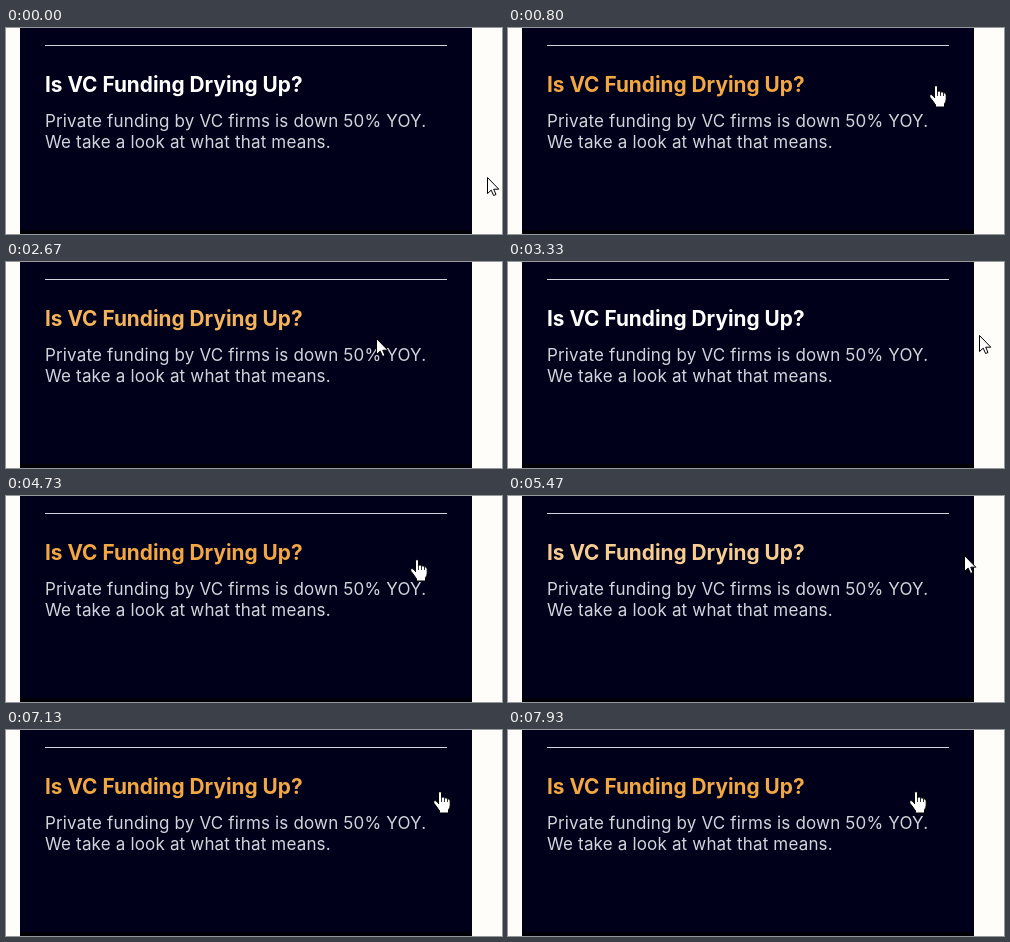
Animation of 496 by 206 pixels, one loop 8 s. Source, as an HTML page with a canvas:

```html
<!DOCTYPE html>
<html lang="en">
<head>
<meta charset="utf-8">
<title>Article link hover</title>
<style>
  html, body { margin: 0; width: 100%; height: 100%; overflow: hidden; background: #fffdf9; }
  body { position: relative; font-family: Inter, sans-serif; }
  .card { position: absolute; left: 14px; top: 0; width: 452px; height: 202px; background: #00001a; border-bottom: 4px solid #000006; }
  .rule { position: absolute; left: 25px; top: 17px; width: 402px; height: 1px; background: #d1d5db; }
  h3, p { position: absolute; left: 25px; margin: 0; white-space: nowrap; }
  h3 { top: 43px; font-size: 20.8px; font-weight: 700; line-height: 28px; color: #fff; }
  p { top: 83px; font-size: 17px; line-height: 21px; letter-spacing: 0.01em; color: #d1d5db; }
  canvas { position: absolute; left: 0; top: 0; }
</style>
</head>
<body>
<div class="card">
  <div class="rule"></div>
  <h3 id="title">Is VC Funding Drying Up?</h3>
  <p>Private funding by VC firms is down 50% YOY.<br>We take a look at what that means.</p>
</div>
<canvas id="stage" width="496" height="206"></canvas>
<script>
const STEPS = 120, STEP = 1000 / 15, FADE = 300;
const LINK = { right: 441, bottom: 74 };
const WHITE = [255, 255, 255], ORANGE = [242, 167, 66];
const title = document.getElementById('title');
const ctx = document.getElementById('stage').getContext('2d');

// Turning points of the pointer: time, x, y
const path = [
  [0, 481, 149], [470, 437, 72], [800, 427, 57], [1730, 238, 57], [2200, 238, 57],
  [2800, 405, 79], [3330, 471, 73], [3800, 477, 73], [4730, 410, 63], [4950, 392, 61],
  [5670, 471, 59], [5870, 471, 59], [6470, 420, 61], [6735, 420, 61], [7030, 439, 61],
  [7330, 418, 61], [7600, 426, 61], [7930, 407, 61]
];

const arrow = new Path2D('M.5 .5V16.6L4.2 13.1L6.6 18.5L9 17.5L6.7 12.2H11.8Z');
const hand = new Path2D(
  'M5.5 13V2Q5.5 .5 7 .5T8.5 2V6.3Q10.8 5.4 11.5 7Q13.3 6.2 14.5 7.8Q17.2 7.4 17.2 10V14.2' +
  'Q17.2 16.5 15.5 19V22H6.5V19.5Q5.4 18.6 4 16.2L.9 12.2Q0 10.4 1.6 9.7Q2.8 9.3 4 10.7L5.5 12.4Z');
const knuckles = new Path2D('M8.5 6V11M11.5 7V11M14.5 8V11');

const slope = (i, c) => (path[i + 1][c] - path[i][c]) / (path[i + 1][0] - path[i][0]);

function tangent(i, c) {
  if (i === 0 || i === path.length - 1) return 0;
  const a = slope(i - 1, c), b = slope(i, c);
  return a * b > 0 ? 2 * a * b / (a + b) : 0;
}

// Smooth interpolation without overshoot
function along(t, c) {
  let i = 0;
  while (i < path.length - 2 && path[i + 1][0] <= t) i++;
  const h = path[i + 1][0] - path[i][0], u = Math.min(1, (t - path[i][0]) / h), v = 1 - u;
  return Math.round(path[i][c] * v * v * (1 + 2 * u) + path[i + 1][c] * u * u * (3 - 2 * u) +
    h * u * v * (v * tangent(i, c) - u * tangent(i + 1, c)));
}

// The title fades towards its hover colour while the pointer is on the link
let level = 0;
const poses = Array.from({ length: STEPS }, (_, k) => {
  const x = along(k * STEP, 1), y = along(k * STEP, 2);
  const over = x < LINK.right && y < LINK.bottom;
  level = Math.min(1, Math.max(0, level + (over ? STEP : -STEP) / FADE));
  return { x, y, over, glow: level * level * (3 - 2 * level) };
});

function drawPointer({ x, y, over }) {
  const shape = over ? hand : arrow;
  ctx.clearRect(0, 0, 496, 206);
  ctx.save();
  ctx.translate(x - (over ? 6 : 0), y);
  ctx.lineJoin = 'round';
  ctx.fillStyle = '#fff';
  ctx.fill(shape);
  ctx.stroke(shape);
  if (over) {
    ctx.globalAlpha = 0.8;
    ctx.stroke(knuckles);
  }
  ctx.restore();
}

function frame() {
  const pose = poses[Math.floor((performance.now() + 4) / STEP) % STEPS];
  const color = WHITE.map((w, i) => Math.round(w + (ORANGE[i] - w) * pose.glow));
  title.style.color = `rgb(${color})`;
  drawPointer(pose);
  requestAnimationFrame(frame);
}
frame();
</script>
</body>
</html>
```
